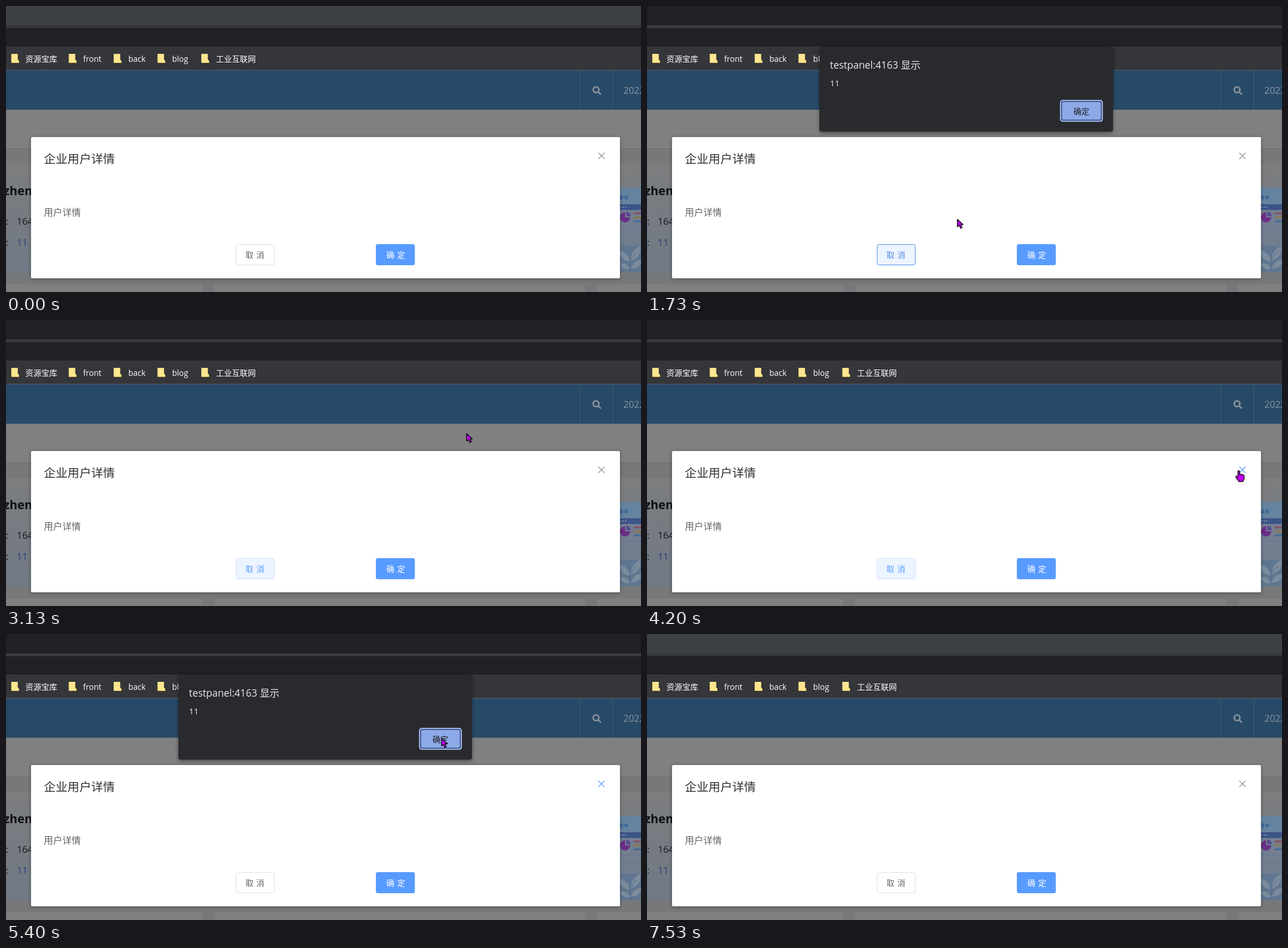
These frames come from a looping animation (1116 by 502 pixels, 7740 ms). An HTML page:

```html
<!DOCTYPE html>
<html lang="zh-CN">
<head>
<meta charset="utf-8">
<title>Dialog close demo</title>
<style>
  html, body { margin: 0; width: 100%; height: 100%; overflow: hidden; background: #777879; }
  svg { display: block; width: 1116px; height: 502px; }
  text { font-family: "Open Sans", "Noto Sans CJK SC", "Noto Sans CJK", sans-serif; white-space: pre; }
  .mark text { font-size: 14px; fill: #fff; }
  .btn { font-size: 14px; text-anchor: middle; word-spacing: 1.5px; }
  #modal { filter: drop-shadow(0 1px 3px rgba(0, 0, 0, .35)); }
  #alert .box { filter: drop-shadow(0 2px 3px rgba(0, 0, 0, .45)); }
</style>
</head>
<body>
<svg viewBox="0 0 1116 502">
  <defs>
    <linearGradient id="cardFill" x1="0" y1="0" x2="0" y2="1">
      <stop offset="0" stop-color="#7c7d7e"/>
      <stop offset="1" stop-color="#717985"/>
    </linearGradient>
    <g id="folder">
      <path d="M.5 0H11.5V10L14 12V16H.5Z" fill="#e9c65a"/>
      <path d="M.5 0H11.5V11H13V15H.5Z" fill="#fde68f"/>
    </g>
  </defs>

  <!-- browser bars -->
  <rect id="tabs" width="1116" height="35"/>
  <rect id="strip" y="34" width="1116" height="5"/>
  <rect y="39" width="1116" height="32" fill="#202124"/>
  <rect y="71" width="1116" height="42" fill="#35363a"/>
  <rect y="112" width="1116" height="1" fill="#5b5c60"/>
  <g class="mark" id="marks"></g>

  <!-- dimmed page -->
  <rect y="113" width="1116" height="69" fill="#284a69"/>
  <path d="M1008.5 113V182M1066.5 113V182" stroke="#3c5c72"/>
  <g fill="none" stroke="#8d959c" stroke-width="2.6">
    <circle cx="1037" cy="147" r="5"/>
    <path d="M1040.6 150.6L1045.4 155.4"/>
  </g>
  <text x="1085" y="153.5" font-size="16.5" fill="#8a949d">2022</text>
  <rect y="182" width="1116" height="69" fill="#808080"/>
  <rect y="250" width="1116" height="1" fill="#6c6c6d"/>
  <rect y="251" width="1116" height="251" fill="#777879"/>
  <rect y="275" width="1116" height="193" fill="url(#cardFill)"/>
  <rect y="275" width="1116" height="1" fill="#70757b"/>
  <g fill="#808080">
    <rect x="-9" y="489" width="354" height="20" rx="2"/>
    <rect x="366" y="489" width="652" height="20" rx="2"/>
    <rect x="1039" y="489" width="90" height="20" rx="2"/>
  </g>
  <text x="-4" y="332" font-size="21" font-weight="700" fill="#0e0f12">zhen</text>
  <g font-size="16.5" fill="#17181c">
    <text x="0" y="384">:</text>
    <text x="19" y="384">164</text>
    <text x="0" y="420.500">:</text>
    <text x="19" y="420.500" fill="#2c3f7f">11</text>
  </g>

  <!-- page illustration -->
  <rect x="1070" y="319" width="46" height="148" fill="#6d7f94"/>
  <rect x="1070" y="319" width="46" height="28" fill="#65839f"/>
  <g fill="#416c96">
    <circle cx="1081" cy="336" r="4"/>
    <circle cx="1090" cy="336" r="3.500"/>
  </g>
  <rect x="1070" y="348" width="46" height="10" fill="#3c5487"/>
  <path d="M1080 353H1090" stroke="#8595ad" stroke-width="2" stroke-dasharray="2 2"/>
  <rect x="1070" y="358" width="46" height="39" fill="#737e91"/>
  <path d="M1088 371V362A9 9 0 1 0 1097 371Z" fill="#6b2f88"/>
  <path d="M1090 369V361A8 8 0 0 1 1098 369Z" fill="#564a91"/>
  <g stroke-width="3">
    <path d="M1103 364H1116" stroke="#86505e"/>
    <path d="M1103 371H1116" stroke="#8a7850"/>
    <path d="M1103 378H1116" stroke="#416c96"/>
  </g>
  <path d="M1079 388H1116" stroke="#63758d"/>
  <rect x="1070" y="397" width="46" height="24" fill="#707d8d"/>
  <rect x="1070" y="421" width="46" height="46" fill="#5f7691"/>
  <g fill="#7c8b9c">
    <path d="M1096 449Q1077 445 1079 429Q1095 434 1096 449Z"/>
    <path d="M1098 447Q1098 428 1115 421Q1118 440 1098 447Z"/>
    <path d="M1097 462Q1082 464 1079 452Q1092 449 1097 462Z"/>
    <path d="M1098 461Q1104 444 1118 446Q1115 461 1098 461Z"/>
  </g>
  <path d="M1097 467V446L1108 431" fill="none" stroke="#526d8c"/>

  <!-- modal -->
  <g id="modal">
    <rect x="44" y="230" width="1035" height="248" rx="2.500" fill="#fff"/>
  </g>
  <text x="66.500" y="276" font-size="20.800" fill="#303133">企业用户详情</text>
  <text x="66.500" y="368" font-size="16.300" fill="#606266">用户详情</text>
  <path id="cross" d="M1041 257.500L1052 268.500M1052 257.500L1041 268.500" fill="none" stroke-width="1.200"/>
  <rect id="cancel" x="404.500" y="418.500" width="67" height="36" rx="3"/>
  <text id="cancelText" class="btn" x="437.500" y="442">取 消</text>
  <rect x="650" y="418" width="68.500" height="37" rx="3.500" fill="#589bff"/>
  <text class="btn" x="685" y="442" fill="#fff" font-weight="500">确 定</text>

  <!-- browser alert -->
  <g id="alert">
    <rect class="box" x="303" y="71" width="516" height="149.500" rx="4" fill="#292a2d"/>
    <text x="321.500" y="110" font-size="17.400" fill="#e8eaed">testpanel:4163 显示</text>
    <text x="321.500" y="141" font-size="15" fill="#e8eaed">11</text>
    <rect x="727" y="166" width="74" height="37" rx="4" fill="#8da9e8"/>
    <g id="ring" fill="none">
      <rect x="728.500" y="167.500" width="70" height="33" rx="3" stroke="#25345c" stroke-width="1.500"/>
      <rect x="726.750" y="165.750" width="73.500" height="36.500" rx="4" stroke="#a3bbf2" stroke-width="2"/>
    </g>
    <text class="btn" x="763.500" y="189.500" fill="#202124">确定</text>
  </g>

  <!-- pointer -->
  <g id="pointer" stroke="#000" stroke-width="1.300" stroke-linejoin="round" fill="#c000f5">
    <path id="arrow" d="M.5 .5V13.500L3.800 10.800L6 16.200L8.800 15L6.600 9.800H10.500Z"/>
    <path id="hand" d="M-1.500 11V1.500Q0 -1 1.500 1.500V7Q3 5.500 4.300 7.200Q6 6.200 7 8Q9.200 7.300 9.500 9.500V14Q9 17 7.500 19.500H0Q-2 16 -5 12Q-5.300 9.300 -3 10Z"/>
  </g>
</svg>

<script>
const LOOP = 7740, STEP = 1000 / 15;
const $ = id => document.getElementById(id);
const paint = (id, attrs) => {
  for (const key in attrs) $(id).setAttribute(key, attrs[key]);
};
const show = (id, on) => paint(id, { visibility: on ? "visible" : "hidden" });
const within = (n, from, to) => n >= from && n < to;

$("marks").innerHTML = [
  [9, 34, "资源宝库"], [110, 135.5, "front"], [189, 215, "back"], [266, 292, "blog"], [343, 369, "工业互联网"]
].map(([x, tx, label]) =>
  `<use href="#folder" x="${x}" y="84"/><text x="${tx}" y="97.500">${label}</text>`).join("");

// rows: step, x, y
const path = [
  [13, 513, 492], [14, 504, 477], [15, 468, 452], [17, 456, 444], [24, 456, 444],
  [30, 722, 234], [31, 788, 203], [32, 826, 185], [33, 826, 185],
  [41, 775, 191], [44, 774, 190], [46, 790, 194], [57, 999, 252],
  [61, 1040, 264], [66, 1040, 264], [67, 1039, 267], [69, 1030, 280],
  [79, 768, 188], [81, 765, 183], [99, 765, 183], [105, 209, 476]
];

// rows: step, opacity, vertical shift
const opening = [[0, 0, -21], [1, .4, -17], [2, .7, -9], [3, .9, -4], [4, 1, 0]];
const closing = [[0, 1, 0], [1, .77, -10], [2, .4, -16], [3, 0, -20]];
const at = (start, rows) => rows.map(([n, ...rest]) => [n + start, ...rest]);
const fade = [...at(21, opening), ...at(44, closing), ...at(67, opening), ...at(96, closing)];

const cancelStyles = {
  plain: ["#fff", "#dcdfe6", "#606266"],
  focus: ["#ecf4ff", "#cbe0ff", "#589bff"],
  press: ["#ecf4ff", "#4f8ce6", "#4f8ce6"]
};

function sample(rows, n) {
  const i = rows.findIndex(row => row[0] > n);
  if (i < 0) return rows[rows.length - 1].slice(1);
  if (i === 0) return rows[0].slice(1);
  const a = rows[i - 1], b = rows[i], k = (n - a[0]) / (b[0] - a[0]);
  return a.slice(1).map((v, j) => v + (b[j + 1] - v) * k);
}

function cancelState(n) {
  if (within(n, 19, 45)) return "press";
  return within(n, 15, 67) ? "focus" : "plain";
}

function draw(n) {
  const blurred = within(n, 21, 113);
  paint("tabs", { fill: blurred ? "#202124" : "#3d4144" });
  paint("strip", { fill: blurred ? "#3a3b3f" : "#35363a" });

  const [fill, stroke, ink] = cancelStyles[cancelState(n)];
  paint("cancel", { fill, stroke });
  paint("cancelText", { fill: ink });
  paint("cross", { stroke: within(n, 61, 113) ? "#589bff" : "#909399" });

  const [opacity, dy] = sample(fade, n);
  const grow = 1 - dy * .0003;
  paint("alert", {
    opacity,
    transform: `translate(561 ${dy}) scale(${grow} 1) translate(-561 0)`
  });
  show("alert", opacity > 0);
  show("ring", opacity > 0 && !within(n, 43, 48) && !within(n, 94, 100));

  const visible = within(n, 13, 106);
  const hand = within(n, 15, 25) || within(n, 61, 68);
  const [x, y] = sample(path, n).map(Math.round);
  paint("pointer", { transform: `translate(${x} ${y})` });
  show("arrow", visible && !hand);
  show("hand", visible && hand);
}

const start = performance.now();
function tick() {
  const time = (performance.now() - start) % LOOP;
  draw(Math.floor((time + 3.4) / STEP));
  requestAnimationFrame(tick);
}
tick();
</script>
</body>
</html>
```
